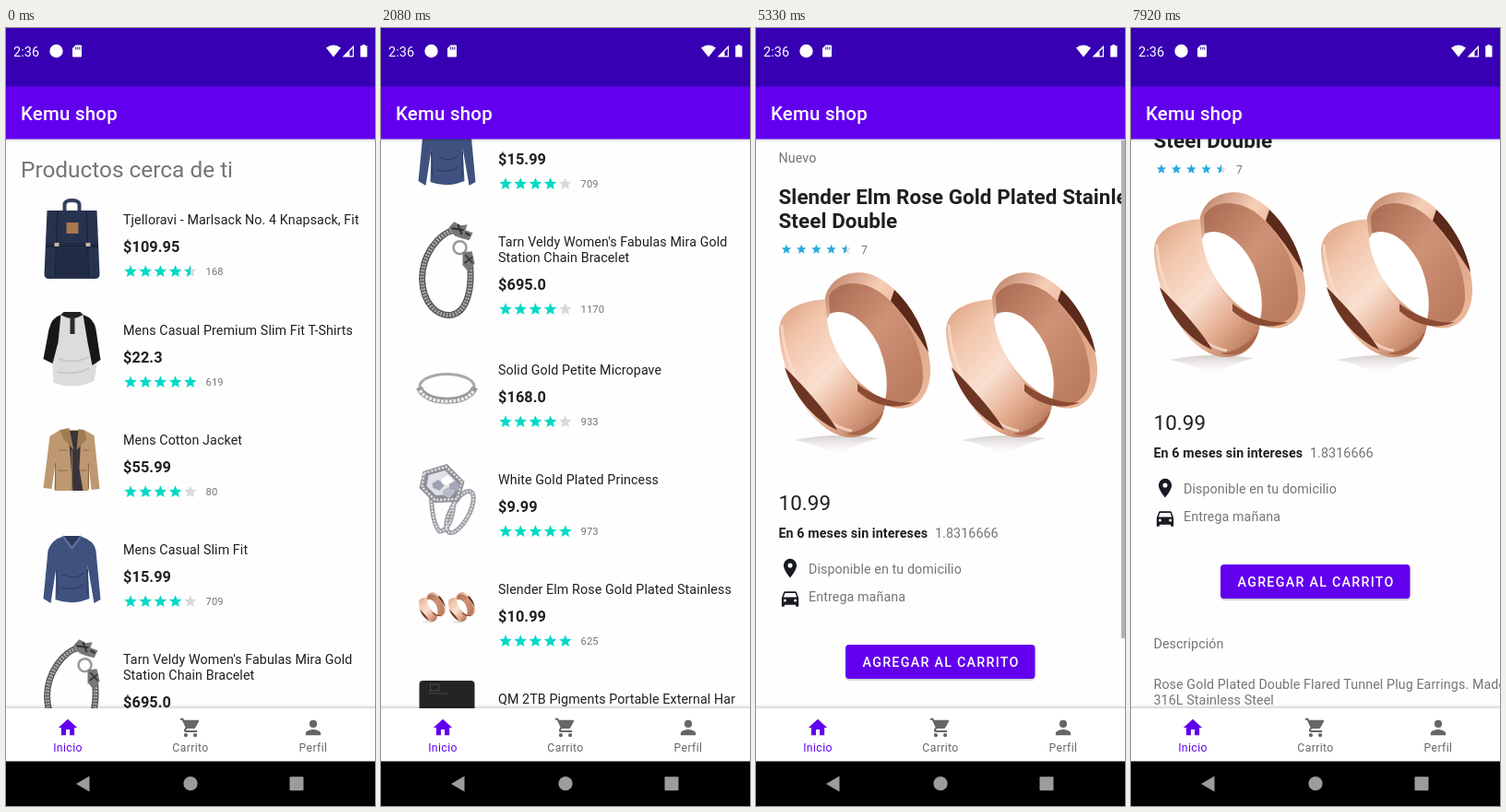
Animation of 400 by 844 pixels, one loop 8000 ms. Source, as an HTML page:

```html
<!DOCTYPE html>
<html lang="es">
<head>
<meta charset="utf-8">
<title>Kemu shop</title>
<style>
html, body { margin: 0; width: 100%; height: 100%; overflow: hidden; background: #fff; }
svg { display: block; width: 100%; height: 100%; }
text { font-family: Roboto, sans-serif; letter-spacing: .1px; white-space: pre; }
</style>
</head>
<body>
<svg id="stage" viewBox="0 0 400 844"></svg>
<script>
const PURPLE = '#6200ee', INK = '#1f1f1f', GREY = '#757575', TEAL = '#03dac5', BLUE = '#29abdc';
const LOOP = 8000, DP = 1.0186;

const icons = {
  star: 'M12 17.27L18.18 21l-1.64-7.03L22 9.24l-7.19-.61L12 2 9.19 8.63 2 9.24l5.46 4.73L5.82 21z',
  home: 'M10 20v-6h4v6h5v-8h3L12 3 2 12h3v8z',
  cart: 'M7 18c-1.1 0-2 .9-2 2s.9 2 2 2 2-.9 2-2-.9-2-2-2zM1 2v2h2l3.6 7.59-1.35 2.45C5.1 14.3 5 14.65 5 15c0 1.1.9 2 2 2h12v-2H7.42c-.14 0-.25-.11-.25-.25l.93-1.75h7.45c.75 0 1.41-.41 1.75-1.03l3.58-6.49A1 1 0 0 0 20 4H5.21l-.94-2zM17 18c-1.1 0-2 .9-2 2s.9 2 2 2 2-.9 2-2-.9-2-2-2z',
  person: 'M12 12a4 4 0 1 0 0-8 4 4 0 0 0 0 8zm0 2c-2.67 0-8 1.34-8 4v2h16v-2c0-2.66-5.33-4-8-4z',
  pin: 'M12 2a7 7 0 0 0-7 7c0 5.25 7 13 7 13s7-7.75 7-13a7 7 0 0 0-7-7zm0 9.5a2.5 2.5 0 1 1 0-5 2.5 2.5 0 0 1 0 5z',
  car: 'M18.92 6.01A1.5 1.5 0 0 0 17.5 5h-11c-.66 0-1.21.42-1.42 1.01L3 12v8c0 .55.45 1 1 1h1c.55 0 1-.45 1-1v-1h12v1c0 .55.45 1 1 1h1c.55 0 1-.45 1-1v-8zM6.5 16a1.5 1.5 0 1 1 0-3 1.5 1.5 0 0 1 0 3zm11 0a1.5 1.5 0 1 1 0-3 1.5 1.5 0 0 1 0 3zM5 11l1.5-4.5h11L19 11z'
};

const text = (x, y, s, size, fill = INK, attrs = '') =>
  `<text x="${x}" y="${y}" font-size="${size}" fill="${fill}" ${attrs}>${s}</text>`;
const rect = (x, y, w, h, fill, attrs = '') =>
  `<rect x="${x}" y="${y}" width="${w}" height="${h}" fill="${fill}" ${attrs}/>`;
const path = (d, fill, attrs = '') => `<path d="${d}" fill="${fill}" ${attrs}/>`;
const line = (d, color, w, attrs = '') => path(d, 'none', `stroke="${color}" stroke-width="${w}" ${attrs}`);
const circle = (x, y, r, fill, attrs = '') => `<circle cx="${x}" cy="${y}" r="${r}" fill="${fill}" ${attrs}/>`;
// icon on a 24-unit grid, centred at x, y
const icon = (name, x, y, fill, k = DP) =>
  path(icons[name], fill, `transform="translate(${x} ${y}) scale(${k}) translate(-12 -12)"`);
const stars = (x, y, rating, half, on, k) => [0, 1, 2, 3, 4].map(i =>
  icon('star', x + i * 16.2, y, rating >= i + 1 ? on : rating > i ? `url(#${half})` : '#d9d9d9', k)).join('');
const stops = list => list.map(([o, c, a = 1]) => `<stop offset="${o}" stop-color="${c}" stop-opacity="${a}"/>`).join('');
const gradient = (id, dir, list) => `<linearGradient id="${id}" ${dir}>${stops(list)}</linearGradient>`;
const DOWN = 'x1="0" y1="0" x2="0" y2="1"';

const ring =
  path('M42 447Q85 438 133 445Q100 454 88 466Q70 452 42 447Z', 'url(#mirror)') +
  path('M77 294C50 296 26 304 25 328C26 376 60 440 100 444C124 445 137 430 140 408L100 360Z', 'url(#band)') +
  line('M28 322C30 368 62 430 104 437', '#fae2d4', 3, 'opacity=".7"') +
  path('M31 368C40 398 62 425 88 436C77 417 55 392 31 368Z', '#6d3523') +
  path('M97 440C114 445 132 438 138 416C126 432 112 438 97 440Z', '#a8664b') +
  path('M75 292C80 271 103 261 124 267C160 280 186 328 189 368C190 400 172 416 150 412C108 402 76 345 75 292Z', 'url(#lip)') +
  path('M79 291C88 274 112 273 132 285C162 305 182 348 181 381C179 402 165 410 149 407C108 398 79 345 79 291Z', 'url(#wall)') +
  path('M80 310C98 302 120 318 133 345C141 364 144 386 140 403C108 390 80 350 77 316Z', '#fff') +
  path('M150 284C169 302 183 328 187 352C180 341 166 318 146 296Z', '#5b2a1b') +
  path('M110 394C130 412 154 414 170 406C150 408 128 400 110 386Z', '#8a4a33');

const gem = (x, y, c) => path(`M${x} ${y}l7 -4 6 6 -5 6 -7 -3z`, c);
const art = [
  // rucksack
  line('M-8 -31v-7q1 -4 8 -4t8 4v7', '#34405c', 4) +
  path('M-27 -31H27L30 38Q30 43 25 43H-25Q-30 43 -30 38Z', '#27324e') +
  path('M-28 4H28V9H-28ZM-18 10H18V41H-18Z', '#202a44') +
  line('M-16 -30L-18 41M16 -30L18 41M-28 8H28', '#18213a', 1) +
  rect(-6, -18, 13, 12, '#a97850') +
  rect(-19, 4, 5, 4, '#c8b79e') + rect(15, 4, 5, 4, '#c8b79e'),
  // raglan shirt
  path('M-14 -38L14 -38L22 -30L28 10L24 34Q2 44 -20 36L-22 0Z', '#dcdcde') +
  path('M-12 -38Q-22 -35 -25 -22L-31 10L-21 15L-15 -8Z', '#17171a') +
  path('M12 -38Q24 -34 26 -22L31 11L22 17L17 -8Z', '#17171a') +
  path('M-12 -38Q0 -30 12 -38L9 -41H-9Z', '#222') +
  rect(-2, -36, 5, 19, '#2a2a2d') + line('M-14 10Q2 16 18 8M-16 24Q4 28 19 20', '#c4c4c8', 1.5),
  // jacket
  path('M-13 -32L13 -32L24 -26L30 32L21 33L18 4L18 34H-19L-18 4L-22 32L-31 31L-24 -25Z', '#bd9870') +
  path('M-4 -31H10L8 10L12 34H1Z', '#38353a') +
  path('M-13 -32L-3 -34L2 -10L-9 -22ZM13 -32L7 -33L5 -10L16 -22Z', '#a07c55') +
  line('M-18 4V32M18 4V32M-15 12H-5M9 12H16M-14 -10H-5M0 -10V33M12 -10H19', '#8d6b48', 1.2),
  // sweater
  path('M-11 -35L11 -35Q24 -31 26 -20L31 33L24 37L17 -4L19 32Q0 40 -18 33L-17 -2L-23 37L-31 32L-26 -20Q-22 -32 -11 -35Z', '#3f527f') +
  path('M-9 -36H9L0 -23Z', '#2b385a') + line('M-10 -36L0 -23L10 -36', '#6476a0', 2) +
  line('M-17 0L-15 28M17 0L16 28M-10 6Q4 12 13 4M-11 20Q4 24 13 16', '#2f3f66', 1.3),
  // chain bracelet
  ['#5c5c5c 7', '#c9c9c9 4" stroke-dasharray="1.6 1.8', '#777 1'].map(s => {
    const [c, ...w] = s.split(' ');
    return line('M8 -44C-10 -40 -27 -16 -27 9C-26 37 -10 50 5 48C22 45 29 18 24 -15', c, w.join(' '));
  }).join('') +
  path('M2 -47L8 -53L15 -49L22 -50L20 -44L28 -41L24 -33L16 -35L8 -38Z', '#777') +
  line('M5 -46L18 -44M12 -50L16 -39M20 -41L25 -38', '#303030', 2) +
  circle(14, -25, 7, 'none', 'stroke="#999" stroke-width="2.5"') +
  path('M17 -20L27 -21L30 -8L24 2L17 -6Z', '#777') + line('M20 -17L28 -8M19 -8L28 -15', '#333', 1.5),
  // thin band
  '<ellipse rx="29.5" ry="13.5" cy="-3" fill="none" stroke="#a9a9ac" stroke-width="3"/>' +
  line('M-30 -2C-24 17 24 17 30 -2', '#98989c', 7) +
  line('M-29 1C-22 17 22 17 29 1', '#ededf0', 3.5, 'stroke-dasharray="3 1.4"'),
  // stone ring
  '<g fill="none" stroke="#9b9ba2" stroke-width="5"><path d="M-17 -2Q-16 26 -8 35Q6 34 8 -2"/><ellipse cx="14" cy="14" rx="10" ry="25" transform="rotate(28 14 14)"/></g>' +
  '<g fill="none" stroke="#e4e4ea" stroke-width="2" stroke-dasharray="2 1.5"><path d="M-17 -2Q-16 26 -8 35Q6 34 8 -2"/><ellipse cx="14" cy="14" rx="10" ry="25" transform="rotate(28 14 14)"/></g>' +
  path('M-26 -30L0 -38L19 -19L13 3L-14 4L-30 -12Z', '#8d8d94') +
  line('M-25 -28L-1 -35L16 -19L11 0L-13 1L-27 -13Z', '#d8d8de', 2.5, 'stroke-dasharray="2.5 1.5"') +
  path('M-20 -26L-2 -31L11 -18L7 -5L-12 -4L-22 -14Z', '#dfe0e8') +
  gem(-16, -17, '#9fa1b2') + gem(-5, -9, '#b8bac8') + gem(-6, -22, '#fff') + gem(2, -16, '#a6a8b8'),
  // pair of rings
  '<use href="#pair" transform="scale(.177) translate(-198 -365)"/>',
  // portable drive
  rect(-30, -41, 60, 81, '#242426', 'rx="4"') + rect(-29, 34, 58, 6, '#131315', 'rx="3"') +
  rect(-18, -37, 9, 7, 'none', 'stroke="#4a4a4d"') + rect(-20, -28, 22, 1.5, '#3a3a3d') + rect(3, 24, 20, 2, '#333336'),
  // solid state drive
  rect(-31, -23, 62, 46, '#1b1a1d', 'rx="2"') + rect(-20, -21, 50, 30, '#0d0c0e') +
  text(-11, -9, 'SSD RULO', 6.5, '#eee', 'font-weight="700" font-style="italic"') + rect(-31, 0, 62, 4, '#b33332')
];

// title, price, rating, votes, title centre
const products = [
  ['Tjelloravi - Marlsack No. 4 Knapsack, Fit', '109.95', 4.5, 168, 208],
  ['Mens Casual Premium Slim Fit T-Shirts', '22.3', 5, 619, 328],
  ['Mens Cotton Jacket', '55.99', 4, 80, 447],
  ['Mens Casual Slim Fit', '15.99', 4, 709, 566],
  ["Tarn Veldy Women's Fabulas Mira Gold|Station Chain Bracelet", '695.0', 4, 1170, 685],
  ['Solid Gold Petite Micropave', '168.0', 4, 933, 824],
  ['White Gold Plated Princess', '9.99', 5, 973, 943],
  ['Slender Elm Rose Gold Plated Stainless', '10.99', 5, 625, 1062],
  ['QM 2TB Pigments Portable External Hard', '64.0', 4, 693, 1181],
  ['TarVonk SSD RULO 1TB Internal SSD - SATA', '109.0', 4, 600, 1299]
];

const row = ([title, price, rating, votes, y], i) => {
  const lines = title.split('|'), extra = (lines.length - 1) * 17;
  return `<g transform="translate(71.5 ${y + 21 + extra * .6})">${art[i]}</g>` +
    lines.map((s, n) => text(127, y + 5.2 + n * 17, s, 14.26)).join('') +
    text(127, y + 35 + extra, '$' + price, 16.3, INK, 'font-weight="700"') +
    stars(135, y + 56 + extra, rating, 'halfTeal', TEAL, .68) +
    text(216.5, y + 60.2 + extra, votes, 11.2, GREY);
};

const detail =
  text(24.5, 146, 'Nuevo', 14.26, GREY) +
  text(24.5, 190.5, 'Slender Elm Rose Gold Plated Stainless', 22.4, INK, 'font-weight="700"') +
  text(24.5, 217, 'Steel Double', 22.4, INK, 'font-weight="700"') +
  stars(33, 240, 4.5, 'halfBlue', BLUE, .52) + text(114, 244.5, '7', 12.2, GREY) +
  '<use href="#pair"/>' +
  text(24.5, 523, '10.99', 22.4) +
  text(24.5, 553, 'En 6 meses sin intereses', 14.26, INK, 'font-weight="700"') +
  text(194, 553, '1.8316666', 14.26, GREY) +
  icon('pin', 37, 586, '#171a22') + text(57, 591.5, 'Disponible en tu domicilio', 14.26, GREY) +
  icon('car', 37, 618.5, '#171a22') + text(57, 621.7, 'Entrega mañana', 14.26, GREY) +
  rect(97, 671, 205.5, 37, '#000', 'rx="4" opacity=".16"') + rect(97, 669, 205.5, 37, PURPLE, 'rx="4"') +
  text(200.6, 693, 'AGREGAR AL CARRITO', 14.26, '#fff', 'text-anchor="middle" font-weight="500" style="letter-spacing:1.27px"') +
  text(24.5, 760, 'Descripción', 14.26, GREY) +
  text(24.5, 804.3, 'Rose Gold Plated Double Flared Tunnel Plug Earrings. Made of', 14.26, GREY) +
  text(24.5, 821, '316L Stainless Steel', 14.26, GREY);

const tab = (x, name, label, color) => icon(name, x, 759, color) +
  text(x, 785, label, 12.2, color, 'text-anchor="middle" style="letter-spacing:.4px"');

const chrome =
  rect(0, 120, 400, 4, 'url(#shade)') +
  rect(0, 0, 400, 64, '#3700b3') + rect(0, 63.5, 400, 57, PURPLE) +
  text(16, 100, 'Kemu shop', 20.4, '#fff', 'font-weight="500" style="letter-spacing:.25px"') +
  text(8, 30.7, '2:36', 14.4, '#fff') + circle(54.5, 25, 7.2, '#fff') +
  path('M75.5 18.5H81Q82 18.5 82 19.5V30.5Q82 31.5 81 31.5H73Q72 31.5 72 30.5V22Z', '#fff') +
  line('M75.7 20.5v3M77.8 20.5v3M79.9 20.5v3', '#3700b3', 1) +
  path('M355 31.6L347 21.6Q355 15.4 363 21.6Z', '#fff') +
  path('M364.5 31.5H377V18.8Z', '#fff') + path('M372.5 30.2H375.8V22L372.5 25.4Z', '#3700b3') +
  path('M386.3 18H389.3V19.3H391.5V31.6H384.2V19.3H386.3Z', '#fff') +
  rect(0, 734, 400, 4, 'url(#shade)', 'transform="matrix(1 0 0 -1 0 1472)"') + rect(0, 738, 400, 58, '#fff') +
  tab(67, 'home', 'Inicio', PURPLE) + tab(200, 'cart', 'Carrito', '#666') + tab(333, 'person', 'Perfil', '#666') +
  rect(0, 795.5, 400, 49, '#000') +
  path('M76 820L90.5 811.5V828.5Z', '#9c9c9c') + circle(200, 819.7, 7.6, '#9c9c9c') +
  rect(307.5, 812.3, 15, 15, '#9c9c9c', 'rx="1"');

const half = (id, c) => gradient(id, '', [[.5, c], [.5, '#d9d9d9']]);
const stage = document.getElementById('stage');
stage.innerHTML = `<defs>
  ${half('halfTeal', TEAL)}${half('halfBlue', BLUE)}
  ${gradient('shade', DOWN, [[0, '#000', .16], [1, '#000', 0]])}
  ${gradient('mirror', DOWN, [[0, '#9a8880', .4], [1, '#fff', 0]])}
  ${gradient('band', 'x1="0" y1="0" x2=".8" y2="1"', [[0, '#d89c7e'], [.25, '#f2c5ab'], [.55, '#fae0d0'], [.8, '#e2aa8c'], [1, '#bb7c60']])}
  ${gradient('lip', 'x1="0" y1="0" x2="1" y2="1"', [[0, '#b87a5f'], [.3, '#f6cfb8'], [.65, '#dda283'], [1, '#f0bea2']])}
  ${gradient('wall', 'x1="0" y1="0" x2="1" y2="1"', [[0, '#a76a50'], [.45, '#cf9276'], [1, '#b5765a']])}
  <clipPath id="listArea">${rect(0, 120, 384, 618)}</clipPath>
  <clipPath id="pageArea">${rect(0, 120, 400, 618)}</clipPath>
  <g id="pair">${ring}<g transform="translate(181)">${ring}</g></g>
</defs>
${rect(0, 0, 400, 844, '#fefefe')}
<g id="list" clip-path="url(#listArea)"><g id="listBody">
  ${text(16, 162.3, 'Productos cerca de ti', 24.4, GREY, 'style="letter-spacing:0"')}${products.map(row).join('')}
</g></g>
<g id="page" clip-path="url(#pageArea)"><g id="pageBody">${detail}</g>${rect(396, 122, 4, 540, '#b2b2b2', 'id="bar"')}</g>
${chrome}
${circle(0, 0, 11.5, '#fff', 'id="touch" fill-opacity=".6" stroke="#c9c7e4" stroke-width="1.6"')}`;

const $ = id => document.getElementById(id);
const [list, listBody, page, pageBody, bar, touch] =
  ['list', 'listBody', 'page', 'pageBody', 'bar', 'touch'].map($);
const clamp = u => Math.max(0, Math.min(1, u));
const ease = (t, a, b) => .5 - .5 * Math.cos(Math.PI * clamp((t - a) / (b - a)));
const move = (node, x, y) => node.setAttribute('transform', `translate(${x} ${y})`);
const show = (node, on) => node.setAttribute('display', on ? 'inline' : 'none');

function draw(t) {
  const listY = 453 * ease(t, 790, 1980) + 130 * ease(t, 2460, 3350);
  const pageY = 87 * ease(t, 6230, 6850);
  const open = t >= 4750;
  show(list, !open);
  show(page, open);
  move(listBody, 0, -listY);
  move(pageBody, 0, -pageY);
  move(bar, 0, pageY * 75 / 87);
  bar.setAttribute('opacity', 1 - clamp((t - 7200) / 250));

  // start, end, x, y of each finger contact
  const press = [
    [700, 1800, 268, 568 - listY],
    [2380, 3350, 259, 771 - listY],
    [4480, 4640, 284, 500],
    [6080, 6800, 286, 537 - pageY]
  ].find(([a, b]) => t >= a && t < b);
  show(touch, press);
  if (press) move(touch, press[2], press[3]);
}

const start = performance.now();
(function tick() {
  draw((performance.now() - start) % LOOP);
  requestAnimationFrame(tick);
})();
</script>
</body>
</html>
```
